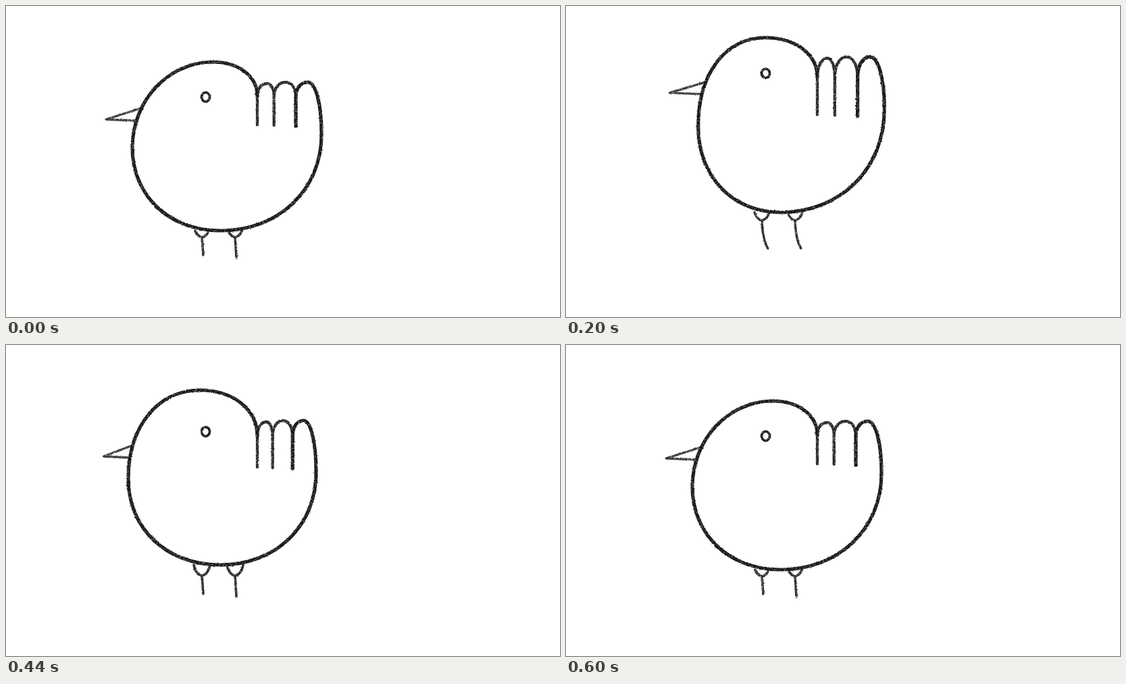
An HTML page that plays this animation: 820x461 px, repeating every 0.64 s.

```html
<!DOCTYPE html>
<html lang="en">
<head>
<meta charset="utf-8">
<title>Bouncing bird</title>
<style>
  html, body { margin: 0; width: 100%; height: 100%; overflow: hidden; background: #fff; }
  svg { display: block; width: 100%; height: 100%; }
  path, ellipse { fill: none; stroke: #161616; stroke-linecap: round; stroke-linejoin: round; }
  #body { stroke-width: 5.2; }
  #feathers { stroke: #262626; stroke-width: 4.3; }
  #legs { stroke: #2b2b2b; stroke-width: 3.6; }
  #beak { stroke: #383838; stroke-width: 3.4; }
  #eye { stroke-width: 3.7; }
</style>
</head>
<body>
<svg viewBox="0 0 820 461">
  <filter id="crayon" filterUnits="userSpaceOnUse" x="120" y="20" width="370" height="370" color-interpolation-filters="sRGB">
    <feTurbulence id="noise" type="fractalNoise" baseFrequency=".4" numOctaves="2" result="grain"/>
    <feDisplacementMap in="SourceGraphic" in2="grain" scale="2.4" xChannelSelector="R" yChannelSelector="G"/>
    <feGaussianBlur stdDeviation=".4" result="rough"/>
    <feColorMatrix in="grain" values="0 0 0 0 0  0 0 0 0 0  0 0 0 0 0  0 0 1.2 0 .36" result="mask"/>
    <feComposite in="rough" in2="mask" operator="in"/>
  </filter>
  <g filter="url(#crayon)">
    <path id="legs"/>
    <path id="beak"/>
    <path id="feathers"/>
    <path id="body"/>
    <ellipse id="eye" cx="295.5" rx="6" ry="6.8"/>
  </g>
</svg>
<script>
// Extremes of the body, heights of the details, feather length, knee drop,
// how far the feet curl up and how full the head is.
const settle = { topX: 306, top: 83, left: 187, right: 467, belly: 333, tip: 113, beak: 168, eye: 135, feather: 63, knee: 11, curl: 0, head: .55 };
const rise = { topX: 296, top: 69, left: 197, right: 469, belly: 324, tip: 102, beak: 156, eye: 122.5, feather: 78, knee: 9, curl: 0, head: .55 };
const stretch = { topX: 293, top: 52, left: 199, right: 470, belly: 311, tip: 84, beak: 136, eye: 105.5, feather: 82, knee: 11, curl: 0, head: .62 };
const hop = { topX: 299, top: 37, left: 189, right: 474, belly: 296, tip: 58, beak: 114, eye: 88.5, feather: 93, knee: 17, curl: 1, head: .55 };
const land = { topX: 287, top: 67, left: 181, right: 459, belly: 326, tip: 112, beak: 165, eye: 128.5, feather: 69, knee: 17, curl: 0, head: .59 };
const squash = { topX: 290, top: 95, left: 180, right: 458, belly: 351, tip: 142, beak: 193, eye: 158, feather: 62, knee: 7, curl: 0, head: .66 };

const LOOP = 640, STEP = 40, ROUND = .58;
const keys = [[0, settle], [80, rise], [160, stretch], [280, hop], [360, hop],
  [440, land], [520, squash], [600, settle], [LOOP, settle]];

const $ = id => document.getElementById(id);
const draw = (id, d) => $(id).setAttribute('d', d);
const mix = (a, b, k) => a + (b - a) * k;

function poseAt(time) {
  const next = keys.findIndex(([start]) => start > time);
  const [t0, from] = keys[next - 1], [t1, to] = keys[next];
  const pose = {};
  for (const name in from) pose[name] = mix(from[name], to[name], (time - t0) / (t1 - t0));
  return pose;
}

// Quarter arcs, named by the direction in which they start
const fromSide = ([ax, ay], [bx, by], k = ROUND) =>
  `C${ax},${mix(ay, by, k)} ${mix(bx, ax, k)},${by} ${bx},${by}`;
const fromFlat = ([ax, ay], [bx, by], k = ROUND) =>
  `C${mix(ax, bx, k)},${ay} ${bx},${mix(by, ay, k)} ${bx},${by}`;

function drawBody(pose) {
  const middle = (pose.top + pose.belly) / 2 + 2;
  const neck = [372, pose.tip + (pose.feather - 14) * .42];
  const top = [pose.topX, pose.top], left = [pose.left, middle];
  const belly = [317, pose.belly], right = [pose.right, pose.tip + 77];

  // Three feathers share the width between the neck and the right side
  const edges = [0, .26, .6, 1].map(k => mix(neck[0], right[0], k));
  const tips = [0, 1, 2].map(i => [mix(edges[i], edges[i + 1], .58 - i * .06), pose.tip + (i ? 0 : 2)]);
  const ends = [0, 1, 2].map(i => `L${edges[i]},${pose.tip + pose.feather + i}`);
  const shoulder = i => [edges[i], neck[1]];
  const arch = i => `M${shoulder(i)}` + fromSide(shoulder(i), tips[i]) +
    fromFlat(tips[i], shoulder(i + 1)) + ends[i + 1];

  draw('feathers', `M${neck}${ends[0]}` + arch(0) + arch(1));
  draw('body', `M${neck}` + fromSide(neck, top) + fromFlat(top, left, pose.head) +
    fromSide(left, belly) + fromFlat(belly, right) +
    fromSide(right, tips[2]) + fromFlat(tips[2], shoulder(2)) + ends[2]);

  const edgeAt = y => mix(top[0], left[0], Math.sqrt(1 - ((middle - y) / (middle - pose.top)) ** 2)) - 2;
  const upper = pose.beak - 16, lower = pose.beak + 2;
  draw('beak', `M${edgeAt(upper)},${upper}L${pose.left * .6 + 36},${pose.beak}L${edgeAt(lower)},${lower}`);
}

function leg(pose, hip, ground, lift) {
  const knee = pose.belly + pose.knee - 1, half = 7 + pose.knee * .3;
  const foot = ground - lift * pose.curl;
  const bend = mix((knee + foot) / 2, foot + 1, pose.curl);
  return `M${hip - half},${pose.belly}Q${hip - half + 3},${knee - 2} ${hip},${knee}` +
    `Q${hip + half - 3},${knee - 2} ${hip + half},${pose.belly}` +
    `M${hip},${knee}Q${hip + 1},${bend} ${hip + 2 + 20 * pose.curl},${foot}`;
}

function render(time) {
  const pose = poseAt(time);
  drawBody(pose);
  draw('legs', leg(pose, 290, 369, 29) + leg(pose, 339, 373, 42));
  $('eye').setAttribute('cy', pose.eye);
  $('noise').setAttribute('seed', 1 + time % 600 / STEP);
}

const start = performance.now();
let shown = -1;
function tick() {
  const time = Math.floor((performance.now() - start) % LOOP / STEP) * STEP;
  if (time !== shown) render(shown = time);
  requestAnimationFrame(tick);
}
tick();
</script>
</body>
</html>
```
